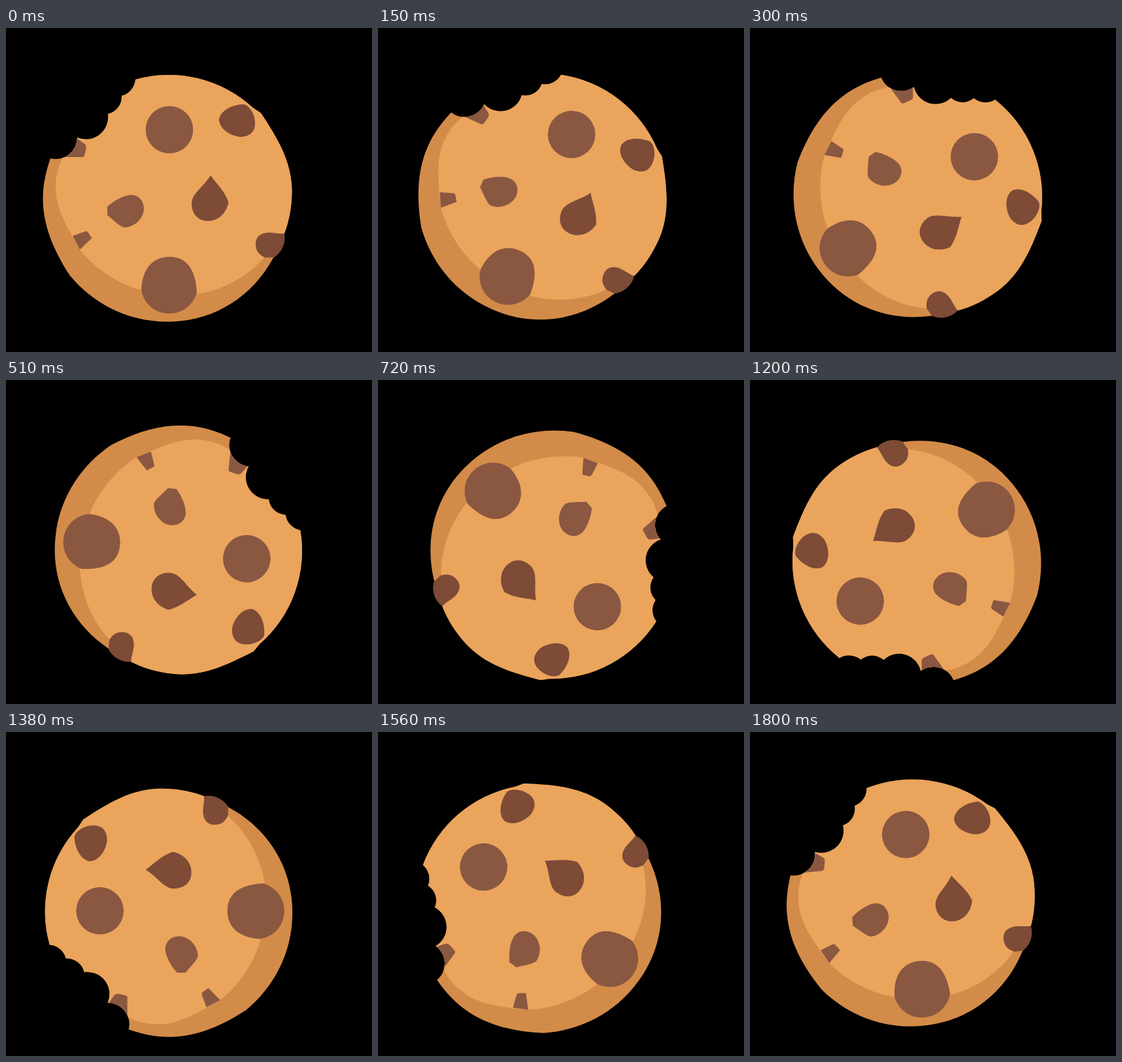
An HTML page that plays this animation: 560 px wide and 497 px high, repeating every 1.83 s.

```html
<!DOCTYPE html>
<html lang="en">
<head>
<meta charset="utf-8">
<title>Rolling cookie</title>
<style>
  html, body { margin: 0; width: 100%; height: 100%; overflow: hidden; background: #000; }
  svg { display: block; width: 100%; height: 100%; }
  .rim { fill: #d38b49; }
  .face { fill: #eaa45c; }
  .milk { fill: #8a5741; }
  .dark { fill: #7d4b36; }
</style>
</head>
<body>
<svg viewBox="0 0 560 497">
  <defs>
    <clipPath id="outline">
      <path d="M198 79 A189.8 189.8 0 0 1 378 122.5 L390 130.5
        C416 170 436.5 204 437.5 248 C437.5 272 434 294 426 315 L409 352.5
        C377 412 318 450.5 248 450.5 C184 451 131 420 98 380
        C75 345 56.5 305 56.5 262 C56.5 240 61 220 68 200
        A33 33 0 0 0 109 168 A34 34 0 0 0 156 132
        A27 27 0 0 0 177 104 A28 28 0 0 0 198 79Z"/>
    </clipPath>
  </defs>
  <g id="cookie">
    <g clip-path="url(#outline)">
      <rect class="rim" x="40" y="60" width="420" height="410"/>
      <path class="face" d="M88 197 C79 213 76 228 76 245 C76 275 90 300 113 340
        C135 368 170 392 206 402 C235 410 265 411 292 408
        C333 402 372 380 397 350 L425 316 L460 300 V50 H88Z"/>
      <path class="milk" d="M95 160 L110 170.5 L120 177.5 Q123.5 180 122.5 185
        L120 196 Q119 198 117 198 H87Z"/>
    </g>
    <circle class="milk" cx="250" cy="156" r="36.3"/>
    <path class="milk" d="M155 274 C164 266 178 257 191 256 C204 256 211 266 211 278
      C210 293 196 306 180 306 C172 303 163 293 155 287Z"/>
    <path class="milk" d="M250 351 C278 351 290 372 292 406 C286 425 270 438 250 438
      C229 438 211 424 207 402 C208 370 224 351 250 351Z"/>
    <path class="milk" d="M102 319 L121 312 Q124 311 125.5 313.5 L131.5 322 L113 340Z"/>
    <path class="dark" d="M363 117 C370 117 381 130 381 146 C381 160 372 167 358 167
      C342 165 326 154 326 140 C328 128 343 118 363 117Z"/>
    <path class="dark" d="M313 226 C321 238 335 250 340.5 267.5 C337 284 325 296 309 296
      C293 296 284 284 284 269 C284 254 303 243 313 226Z"/>
    <path class="dark" d="M402 313.7 C410 313.7 418 316 425.5 315.5 C429 327 423 344 410 352 H396
      C386 347 382 341 382 331 C382 320 390 314 402 313.7Z"/>
  </g>
</svg>
<script>
  const LOOP = 1830, STEP = 30, TURN = 6;
  const PIVOT = "256 268.3";
  const cookie = document.getElementById("cookie");
  const start = performance.now();

  // The opening pose is held for two steps, then the cookie turns once per step.
  function draw(time) {
    const step = Math.max(0, Math.floor(time / STEP) - 1);
    cookie.setAttribute("transform", `rotate(${step * TURN} ${PIVOT})`);
  }

  function tick() {
    draw((performance.now() - start) % LOOP);
    requestAnimationFrame(tick);
  }
  tick();
</script>
</body>
</html>
```
